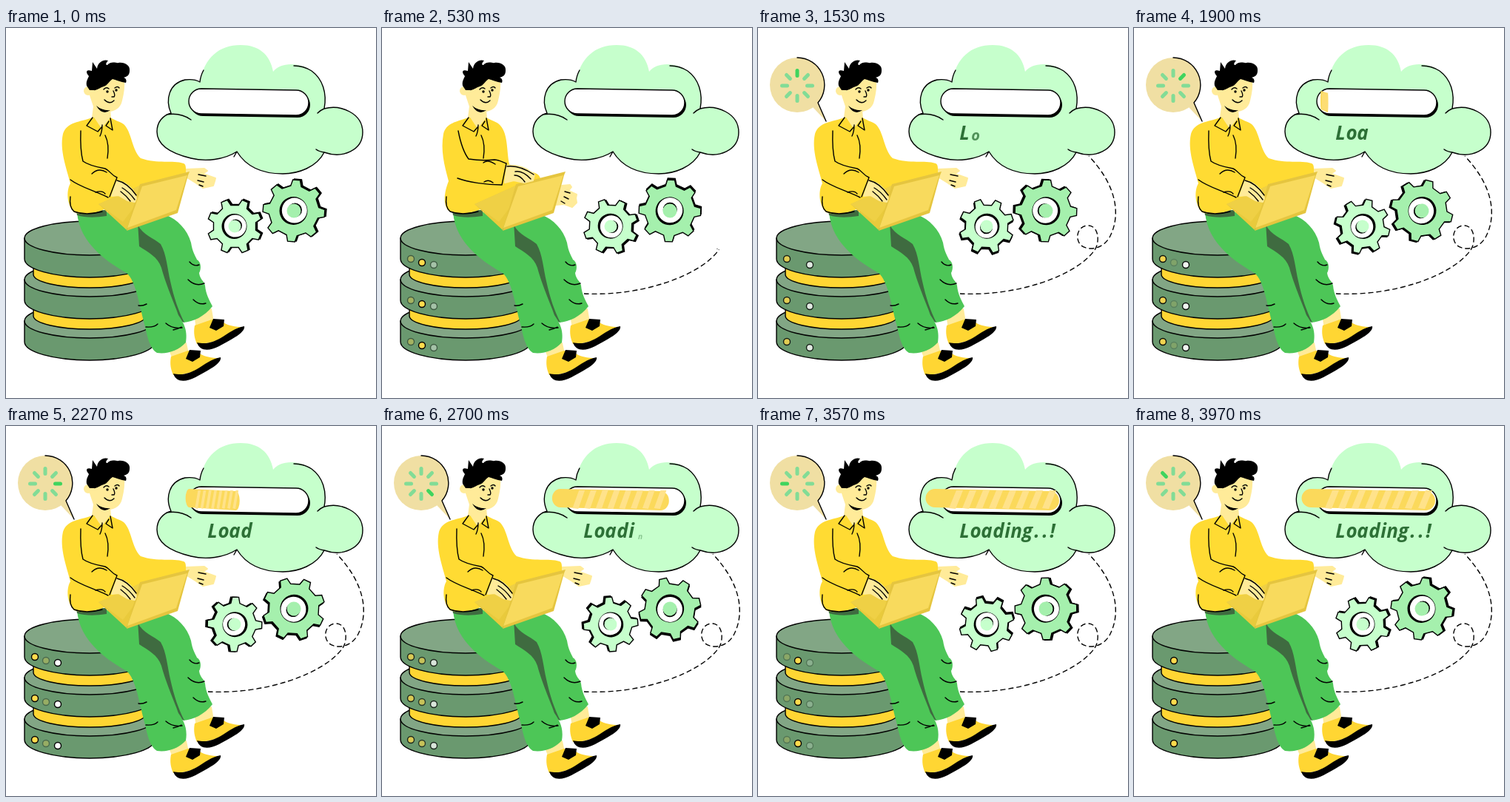
These frames come from a looping animation (500x500 px, 4 s). An HTML page:

```html
<!DOCTYPE html>
<html lang="en">
<head>
<meta charset="utf-8">
<title>Loading</title>
<style>
  html, body { margin: 0; width: 100%; height: 100%; overflow: hidden; background: #fff; }
  svg { display: block; width: 100vw; height: 100vh; }
  .ink { fill: none; stroke: #000; stroke-width: 1.4; stroke-linecap: round; stroke-linejoin: round; }
  .skin { fill: #ffeb99; stroke: #ffeb99; stroke-width: 2; stroke-linejoin: round; }
  .edge { stroke: #000; stroke-width: 1.4; }
  #word { font: italic bold 26px "Open Sans", sans-serif; fill: #2d7036; text-anchor: middle; }
</style>
</head>
<body>
<svg viewBox="0 0 500 500">
  <defs>
    <path id="trail" d="M273 359C350 363 430 335 455 300C462 290 461 267 446 267C432 267 427 285 437 294C448 302 466 298 475 283C491 253 485 213 447 173"/>
    <mask id="reveal" maskUnits="userSpaceOnUse" x="0" y="0" width="500" height="500">
      <use id="wipe" href="#trail" fill="none" stroke="#fff" stroke-width="6"/>
    </mask>
    <g id="disc">
      <path class="edge" fill="#6a996f" d="M25 284V312A88 25 0 0 0 201 312V284Z"/>
      <ellipse class="edge" fill="#82a685" cx="113" cy="284" rx="88" ry="23"/>
    </g>
    <path id="ring" class="edge" fill="#ffd633" d="M37 315V333A76 18 0 0 0 189 333V315Z"/>
    <g id="shoe">
      <path fill="#ffd633" d="M255 402C253 412 255 420 258 427C275 428 300 418 320 404C310 404 300 402 294 398L278 394Z"/>
      <path d="M280 393L295 394L294 403L284 409L275 405ZM258 425C272 428 280 424 290 419C300 413 310 405 322 403C324 411 305 421 288 430C274 437 262 437 258 425Z"/>
    </g>
  </defs>

  <g mask="url(#reveal)"><use href="#trail" class="ink" stroke-dasharray="6 5"/></g>

  <!-- cloud and progress bar -->
  <path fill="#c6ffcc" d="M262 73C268 40 288 23 317 23C342 23 357 36 361 59C370 47 395 45 413 58C428 69 434 88 430 109C452 103 482 115 482 141C482 165 455 177 430 168C420 188 395 197 374 197C348 197 325 188 312 167C295 178 270 181 250 176C225 170 204 160 204 140C204 127 212 118 223 115C215 97 220 75 242 70C250 69 257 70 262 73Z"/>
  <path class="ink" d="M267 57Q263 64 262 73C257 70 250 69 242 70C220 75 215 97 223 115C212 118 204 127 204 140C204 160 225 170 250 176C270 181 295 178 312 167C325 188 348 197 374 197C395 197 420 188 430 168C455 177 482 165 482 141C482 115 452 103 430 109C434 88 428 69 413 58Q402 51 389 51M217 117Q236 114 250 124M312 167L308 174M430 109Q425 111 421 115M430 168Q423 167 419 164"/>
  <path transform="translate(2 3)" d="M264 82L392 84A17 17 0 0 1 392 118L264 116A17 17 0 0 1 264 82Z"/>
  <path class="edge" fill="#fff" d="M264 82L392 84A17 17 0 0 1 392 118L264 116A17 17 0 0 1 264 82Z"/>
  <g id="bar">
    <path fill="#fbd95b" d="M239 85L394 88A13 13 0 0 1 394 114L239 110A12.500 12.500 0 0 1 239 85Z"/>
    <g id="stripes" fill="#ffe28a"></g>
  </g>
  <g id="word"></g>
  <g id="gears"></g>

  <!-- server -->
  <use href="#disc" y="112"/><use href="#ring" y="56"/>
  <use href="#disc" y="56"/><use href="#ring"/>
  <use href="#disc"/>
  <g id="lights"></g>

  <!-- legs -->
  <path class="skin" d="M255 385L277 380L280 398L258 408ZM220 432L243 426L246 440L226 448Z"/>
  <use href="#shoe"/><use href="#shoe" x="-32" y="42"/>
  <path fill="#4dc657" d="M170 262L215 252C232 259 245 272 250 290C252 303 256 308 258 313C264 316 264 326 261 331C262 340 268 342 269 348C270 360 275 368 279 376C268 390 253 397 240 398C226 378 222 330 200 290Z"/>
  <path fill="#3f6b40" d="M178 266C185 280 200 284 209 292C217 306 218 325 222 342C227 365 233 382 241 398L225 392L195 340L176 300Z"/>
  <path fill="#4dc657" d="M96 249L160 249L178 262L180 295C192 303 205 309 210 324C217 350 230 378 233 388C239 397 246 407 243 425C233 436 218 441 204 439C193 432 191 415 187 400C180 374 176 343 163 331C140 318 99 292 96 249Z"/>
  <path fill="#3f6b40" d="M95 247L136 246V254Q112 258 96 253Z"/>
  <path class="ink" d="M248 316Q254 323 261 320M246 340Q256 350 268 345M253 367Q261 375 270 372M179 375Q184 376 190 373M189 404Q200 405 205 400M216 399Q225 407 238 405M226 408Q232 407 237 404"/>

  <!-- body -->
  <path id="farHand" class="skin"/>
  <path id="farFingers" class="ink"/>
  <path class="skin" d="M113 88L119 106L117 121L129 136L141 122L140 110Z"/>
  <path id="shirt" fill="#ffdb33"/>
  <path class="skin" d="M119 119L129 134L140 121L132 114Z"/>
  <path class="ink" d="M117 121L109 132L124 140L130 133M130 131Q130 140 127 146M141 122L144 138L135 132L139 126M87 228Q85 242 92 248Q108 254 130 248M134 145Q140 157 137 176"/>
  <path fill="#e9ca3c" d="M125 238L185 211L163 273Z"/>
  <path fill="#efd045" d="M125 238L185 211L176 238L158 262Z"/>
  <path fill="#e5c53f" d="M181 211L248 194L246 199L232 250L163 274Z"/>
  <path fill="#f8da5d" d="M184 214L245 199L230 246L164 270Z"/>
  <path id="nearHand" class="skin"/>
  <path id="nearFingers" class="ink"/>
  <path id="sleeve" class="ink"/>

  <!-- head -->
  <circle class="skin" cx="111" cy="85" r="5"/>
  <path class="skin" d="M113 78C114 95 121 108 132 112C145 114 154 108 156 98C158 90 160 80 159 70L125 68Z"/>
  <path d="M113 84L109 78C108 72 110 70 112 65C106 58 110 56 116 58L117 46L123 55C124 46 132 42 138 44C134 48 135 50 137 50C142 44 150 48 152 47C160 46 168 50 167 58C167 64 163 66 159 67C163 68 163 72 162 74C155 73 148 70 144 69C138 73 138 77 132 79C126 81 122 85 118 84Z"/>
  <path class="ink" d="M132 83Q135 79 139 82M147 81Q151 78 153 81M145 85Q148 91 146 93H143M133 97Q140 104 146 98"/>
  <path d="M122 105Q130 112 141 111Q130 119 122 105Z"/>
  <circle cx="137" cy="86" r="1.700"/><circle cx="149" cy="84" r="1.700"/>

  <!-- speech bubble -->
  <g id="bubble">
    <path fill="#f0dfa3" d="M74 107L92 126L80 98Z"/>
    <circle cx="53" cy="77" r="37" fill="#f0dfa3"/>
    <path class="ink" d="M53 40A37 37 0 0 1 81 101L92 126"/>
    <g id="spokes" stroke-width="5" stroke-linecap="round"></g>
  </g>
</svg>
<script>
const LOOP = 4000;
const $ = id => document.getElementById(id);
const add = (parent, tag, attrs) => {
  const el = document.createElementNS('http://www.w3.org/2000/svg', tag);
  for (const k in attrs) el.setAttribute(k, attrs[k]);
  return parent.appendChild(el);
};
const set = (el, k, v) => el.setAttribute(k, v);
const span = (t, a, b) => Math.min(1, Math.max(0, (t - a) / (b - a)));
const smooth = x => (1 - Math.cos(Math.PI * x)) / 2;
const keys = (t, list) => {
  const i = Math.max(1, list.findIndex(k => k[0] >= t));
  const [t0, a] = list[i - 1], [t1, b] = list[i];
  return a + (b - a) * smooth(span(t, t0, t1));
};

// Each pair: arms extended, arms drawn in
const poses = {
  shirt: [
    'M117 121C100 127 82 127 77 143C72 165 82 190 87 210C80 222 84 242 92 249C105 254 120 250 133 245L160 235L243 200C243 192 244 184 240 183C225 178 205 184 182 176C170 165 170 140 159 130C153 126 145 124 141 121Z',
    'M117 121C100 127 87 128 83 143C79 165 84 185 90 207C84 222 82 238 90 247C105 254 120 250 133 245L160 235L215 205C212 198 211 198 207 196C195 192 180 190 172 184C168 165 171 140 157 129C153 126 145 124 141 121Z'],
  sleeve: [
    'M101 139Q100 165 104 180Q112 186 134 190C141 193 142 199 150 202L140 228M87 205C100 215 120 220 138 229M116 197Q125 188 136 195M121 222Q130 219 134 224',
    'M103 139Q108 165 117 177Q135 180 152 178C158 178 162 181 168 183L162 212M102 203C115 208 140 212 162 212M137 182Q143 177 153 184M138 208Q144 204 150 209'],
  nearHand: [
    'M150 207C158 207 165 212 171 219L176 230L174 235L164 233L152 226L143 227Z',
    'M169 186C180 185 188 187 196 191L206 198L204 206L192 209L178 206L166 209Z'],
  nearFingers: [
    'M150 206Q164 209 176 226M157 216Q166 221 174 232M155 221Q163 227 168 234',
    'M169 187Q186 185 205 198M180 194Q190 192 201 204M179 199Q187 199 193 208'],
  farHand: [
    'M243 191L268 190L272 193L266 197L283 203L282 207L280 213L266 216L256 209L243 201Z',
    'M243 213L254 212L256 215L252 220L263 225L262 230L263 236L257 242L246 238L235 239Z'],
  farFingers: [
    'M260 198L270 200M259 206L267 208M261 212L266 214',
    'M247 221L254 223M246 228L252 231M242 234L247 237']
};
const shapes = Object.entries(poses).map(([id, [a, b]]) =>
  ({ el: $(id), a, to: b.match(/[\d.]+/g).map(Number) }));
const morph = ({ a, to }, p) => {
  let i = 0;
  return a.replace(/[\d.]+/g, n => (+n + (to[i++] - n) * p).toFixed(2));
};

function makeGear(x, y, phase, tip, root, fill, hub) {
  const points = [];
  for (let i = 0; i < 8; i++)
    for (const [r, o] of [[root, -.27], [tip, -.15], [tip, .15], [root, .27]]) {
      const a = (i + o) * Math.PI / 4 + phase * Math.PI / 180;
      points.push(`${r * Math.cos(a)},${r * Math.sin(a)}`);
    }
  const g = add($('gears'), 'g');
  const outline = points.join(' ');
  add(g, 'polygon', { points: outline, transform: 'translate(2 -1)', class: 'edge' });
  add(g, 'polygon', { points: outline, fill, class: 'edge' });
  add(g, 'circle', { cx: -.5, r: hub * 2 });
  add(g, 'circle', { cx: .8, cy: -.4, r: hub * 2 - 2, fill: '#fff' });
  add(g, 'circle', { cx: 1.5, cy: -1, r: hub });
  add(g, 'circle', { r: hub, fill });
  return angle => set(g, 'transform', `translate(${x} ${y}) rotate(${angle})`);
}
const spinLeft = makeGear(309, 268, 22.5, 37, 29, '#c6ffcc', 8.5);
const spinRight = makeGear(389, 247, 5, 42, 34, '#a5f0ad', 9.5);

for (let x = 258; x < 395; x += 18)
  add($('stripes'), 'path', { d: `M${x} 111L${x + 10} 87h9l-10 25Z` });

const lights = [0, 56, 112].flatMap(dy =>
  [[39, 312, '#ffdb4d'], [54, 317, '#ffdb4d'], [70, 320, '#fff']].map(([cx, cy, fill], i) =>
    ({ i, el: add($('lights'), 'circle', { cx, cy: cy + dy, r: 4.5, fill, class: 'edge' }) })));

const spokes = Array.from({ length: 8 }, (_, i) => add($('spokes'), 'line',
  { x1: 53, x2: 53, y1: 64.5, y2: 57.5, transform: `rotate(${i * 45} 53 78)` }));

const starts = [1150, 1420, 1700, 1990, 2320, 2650, 3050, 3050, 3060, 3350];
const centres = [279, 294, 309, 325, 337, 349, 364, 377, 388, 398];
const letters = [...'Loading..!'].map((ch, i) => {
  const el = add($('word'), 'text');
  el.textContent = ch;
  return { el, x: centres[i], start: starts[i] };
});

const outer = [[0, 0], [530, .4], [930, 1], [1530, .8], [2270, 1], [3170, .45], [3970, 0], [4000, 0]];
const middle = [[0, 0], [530, 1], [930, .3], [1530, 0], [2270, .3], [3170, 1], [3970, 1], [4000, 0]];

const trailLength = $('trail').getTotalLength();

function draw(now) {
  const t = now % LOOP;

  const pose = smooth(span(t, 0, 530)) * (1 - smooth(span(t, 640, 1500)));
  for (const s of shapes) set(s.el, 'd', morph(s, pose));

  const drawn = span(t, 180, 961) * trailLength;
  set($('wipe'), 'stroke-dasharray', `${drawn} 2000`);
  set($('wipe'), 'visibility', drawn ? 'visible' : 'hidden');

  spinLeft(t / LOOP * 360);
  spinRight(-t / LOOP * 360);

  for (const { el, i } of lights) set(el, 'opacity', keys(t, i === 1 ? middle : outer));

  const grow = smooth(span(t, 600, 850));
  const tilt = -13 * (1 - smooth(span(t, 850, 1070)));
  set($('bubble'), 'transform', `translate(92 126) rotate(${tilt}) scale(${grow}) translate(-92 -126)`);
  const active = t < 1100 ? -1 : (Math.floor((t - 2270) / 340 + .2) + 18) % 8;
  spokes.forEach((el, i) => set(el, 'stroke', i === active ? '#3fd45e' : '#82dc96'));

  const fill = smooth(span(t, 1700, 3000));
  set($('bar'), 'transform', `translate(253.6 0) scale(${fill} 1) translate(-253.6 0)`);

  for (const { el, x, start } of letters) {
    const p = Math.sin(span(t, start, start + 200) * Math.PI / 2);
    set(el, 'transform', `translate(${x} ${151 + 3 * (1 - p)}) scale(${p})`);
    set(el, 'opacity', p);
  }
}

const begin = performance.now();
const tick = () => { draw(performance.now() - begin); requestAnimationFrame(tick); };
draw(0);
requestAnimationFrame(tick);
</script>
</body>
</html>
```
